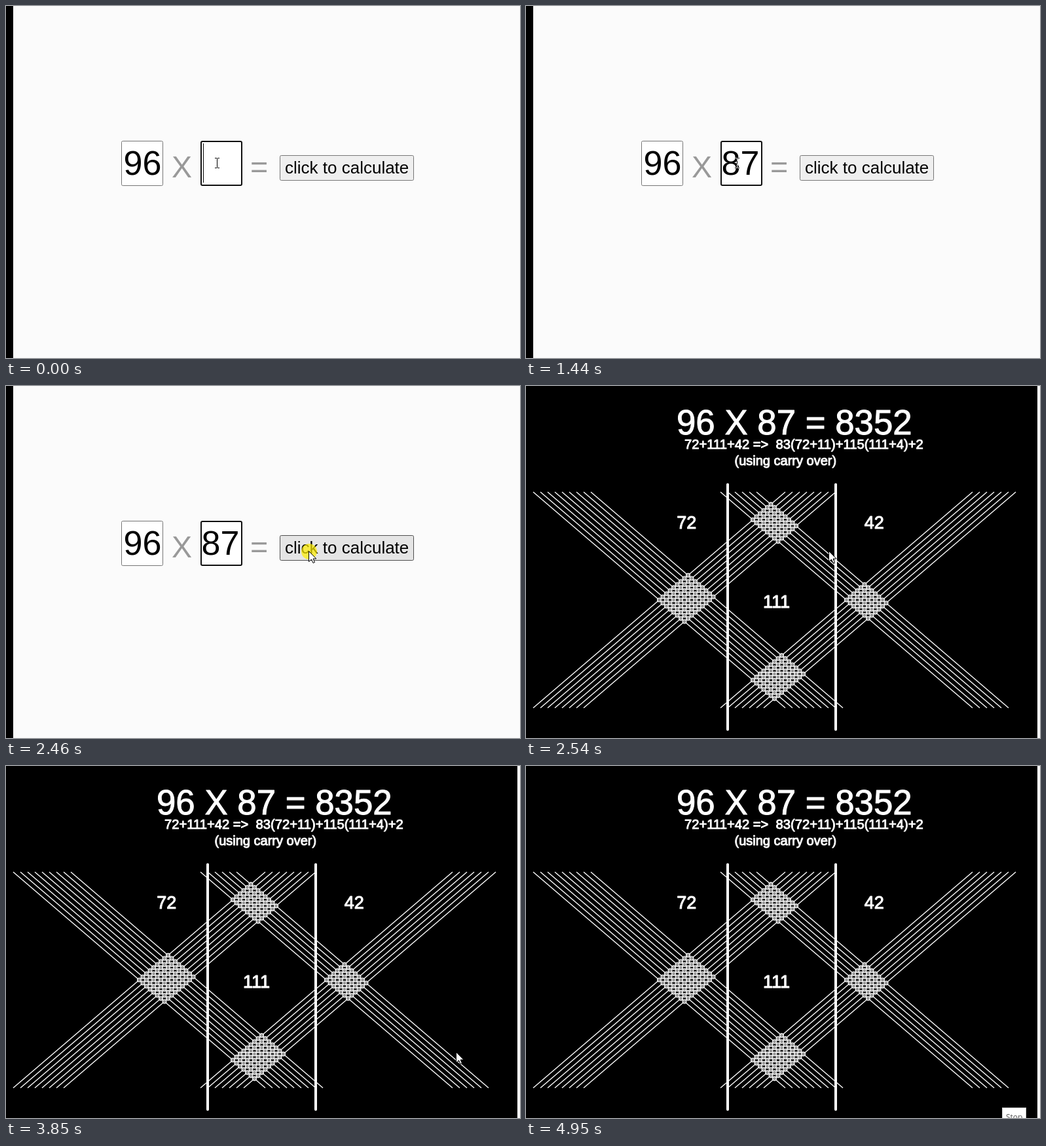
Recreate the animation shown at these times as an HTML page with a canvas. Size 785 by 538 pixels, loop 5130 ms.

```html
<!DOCTYPE html>
<html lang="en">
<head>
<meta charset="utf-8">
<title>Multiplying with lines</title>
<style>
  html, body { margin: 0; width: 100%; height: 100%; overflow: hidden; background: #fbfbfb; }
  canvas { display: block; }
</style>
</head>
<body>
<canvas id="stage" width="785" height="538"></canvas>
<script>
const ctx = document.getElementById('stage').getContext('2d');
const LOOP = 5130, FIRST_KEY = 140, SECOND_KEY = 890, PRESS = 2390, SOLVED = 2540, TOOLTIP = 4800;
const BLINK = 520;           // caret on or off time, restarted by each key
const POINTER_STEP = 77.3;   // the pointer is redrawn at this interval
const SANS = '"Liberation Sans", Arial, sans-serif';

const clamp = (v) => Math.min(1, Math.max(0, v));
const smooth = (p) => p * p * (3 - 2 * p);

// Each stroke of the hand eases from the previous resting point to the next.
const strokes = [
  { from: 1440, to: 1880, x: 444, y: 237 },
  { from: 1910, to: 2140, x: 462, y: 252 },
  { from: 3160, to: 3620, x: 675, y: 430 },
  { from: 3770, to: 3850, x: 688, y: 438 },
  { from: 3850, to: 4340, x: 730, y: 545 }
];

function pointerAt(t) {
  const origin = strokes[0].from;
  const snapped = origin + Math.floor((t - origin) / POINTER_STEP) * POINTER_STEP;
  let x = 322, y = 240;
  for (const s of strokes) {
    const p = smooth(clamp((snapped - s.from) / (s.to - s.from)));
    x += (s.x - x) * p;
    y += (s.y - y) * p;
  }
  return [Math.round(x), Math.round(y)];
}

function text(str, x, y, size, color, strokeWidth = 0, family = SANS) {
  ctx.font = `${size}px ${family}`;
  ctx.fillStyle = color;
  ctx.fillText(str, x, y);
  if (strokeWidth) {
    ctx.strokeStyle = color;
    ctx.lineWidth = strokeWidth;
    ctx.lineJoin = 'round';
    ctx.strokeText(str, x, y);
  }
}

function rect(x, y, w, h, color) {
  ctx.fillStyle = color;
  ctx.fillRect(x, y, w, h);
}

function circle(x, y, r, color) {
  ctx.beginPath();
  ctx.arc(x, y, r, 0, 2 * Math.PI);
  ctx.fillStyle = color;
  ctx.fill();
}

function box(x, y, w, h, fill, border, width) {
  ctx.beginPath();
  ctx.roundRect(x + width / 2, y + width / 2, w - width, h - width, 2);
  ctx.fillStyle = fill;
  ctx.fill();
  ctx.strokeStyle = border;
  ctx.lineWidth = width;
  ctx.stroke();
}

const arrowShape = new Path2D('M0 0V16L4 12.5L6.5 18L9 17L6.6 11.5H11.3Z');

function arrow(x, y) {
  ctx.save();
  ctx.translate(x + 0.5, y + 0.5);
  ctx.fillStyle = '#fff';
  ctx.fill(arrowShape);
  ctx.strokeStyle = '#000';
  ctx.lineWidth = 1;
  ctx.lineJoin = 'miter';
  ctx.stroke(arrowShape);
  ctx.restore();
}

// Inverts what lies below it, as a system text pointer does.
function iBeam(x, y) {
  ctx.globalCompositeOperation = 'difference';
  rect(x, y - 7, 1, 14, '#fff');
  for (const end of [-8, 7]) {
    rect(x - 3, y + end, 3, 1, '#fff');
    rect(x + 1, y + end, 3, 1, '#fff');
  }
  ctx.globalCompositeOperation = 'source-over';
}

function drawInput(t) {
  const lastKey = t >= SECOND_KEY ? SECOND_KEY : t >= FIRST_KEY ? FIRST_KEY : 0;
  const typed = lastKey === SECOND_KEY ? '87' : lastKey === FIRST_KEY ? '8' : '';
  const scroll = typed.length === 2 ? 2 : 0;
  box(297, 206, 64, 69, '#fff', '#101010', 2);
  text(typed, 300.5 - scroll, 258, 52, '#000');
  const caretOn = Math.floor((t - lastKey) / BLINK) % 2 === 0;
  if (caretOn) rect(Math.min(355, 301 + 29 * typed.length), 210, 1, 60, '#000');
}

function drawForm(t, x, y) {
  box(176, 206, 64, 69, '#fff', '#767676', 1);
  text('96', 179.5, 258, 52, '#000');
  text('X', 253, 262, 46.67, '#999');
  drawInput(t);
  text('=', 373, 262, 46.67, '#999');

  const hover = x >= 418;
  box(418, 228, 205, 39, hover ? '#e5e5e5' : '#efefef', hover ? '#4f4f4f' : '#767676', 1);
  text('click to calculate', 426, 256, 26, '#000');

  if (t >= PRESS) circle(x + 1, y + 1, 12, 'rgba(255, 238, 0, 0.7)');
  if (x < 361) iBeam(x, y);
  else arrow(x, y);
}

const TOP = 162, BOTTOM = 492, RUN = 385, GAP = 11, LEFT = 11, RIGHT = 297;
const bundle = (start, count) => Array.from({ length: count }, (_, i) => start + i * GAP);
const falling = [...bundle(LEFT, 9), ...bundle(RIGHT, 6)];
const rising = [...bundle(LEFT, 8), ...bundle(RIGHT, 7)];

function drawLines() {
  ctx.strokeStyle = '#fff';
  ctx.lineWidth = 1.35;
  ctx.lineCap = 'butt';
  ctx.beginPath();
  for (const x of falling) { ctx.moveTo(x, TOP); ctx.lineTo(x + RUN, BOTTOM); }
  for (const x of rising) { ctx.moveTo(x, BOTTOM); ctx.lineTo(x + RUN, TOP); }
  ctx.stroke();

  ctx.lineWidth = 1.1;
  for (const a of falling) for (const b of rising) {
    const x = (a + b + RUN) / 2;
    circle(x, TOP + (x - a) * (BOTTOM - TOP) / RUN, 3, '#999');
    ctx.stroke();
  }

  ctx.lineWidth = 4;
  ctx.lineCap = 'round';
  ctx.beginPath();
  for (const x of [308, 473]) { ctx.moveTo(x, 150.5); ctx.lineTo(x, 525); }
  ctx.stroke();
}

function drawResult(t, x, y) {
  rect(11, 0, 770, 538, '#000');
  text('96 X 87 = 8352', 230, 74.3, 52.8, '#fff', 1);
  text('72+111+42 =>\u00a0 83(72+11)+115(111+4)+2', 242, 96.3, 20.2, '#fff', 1);
  text('(using carry over)', 318.5, 121, 20, '#fff', 1);
  drawLines();
  text('72', 230.3, 217.6, 27, '#fff', 1.1);
  text('111', 362, 338.6, 27, '#fff', 1.1);
  text('42', 516.7, 217.6, 27, '#fff', 1.1);
  arrow(x, y);

  if (t >= TOOLTIP) {
    ctx.globalAlpha = clamp(0.3 + (t - TOOLTIP) / 200);
    rect(727, 522, 37, 16, '#ccc');
    rect(728, 523, 35, 15, '#fff');
    text('Stop', 733, 541, 12, '#575757', 0, '"Open Sans", sans-serif');
    ctx.globalAlpha = 1;
  }
}

function draw(t) {
  const [x, y] = pointerAt(t);
  rect(0, 0, 785, 538, '#fbfbfb');
  rect(0, 0, 11, 538, '#000');
  if (t < SOLVED) drawForm(t, x, y);
  else drawResult(t, x, y);
}

const start = performance.now();
function tick() {
  draw((performance.now() - start) % LOOP);
  requestAnimationFrame(tick);
}
tick();
</script>
</body>
</html>
```
